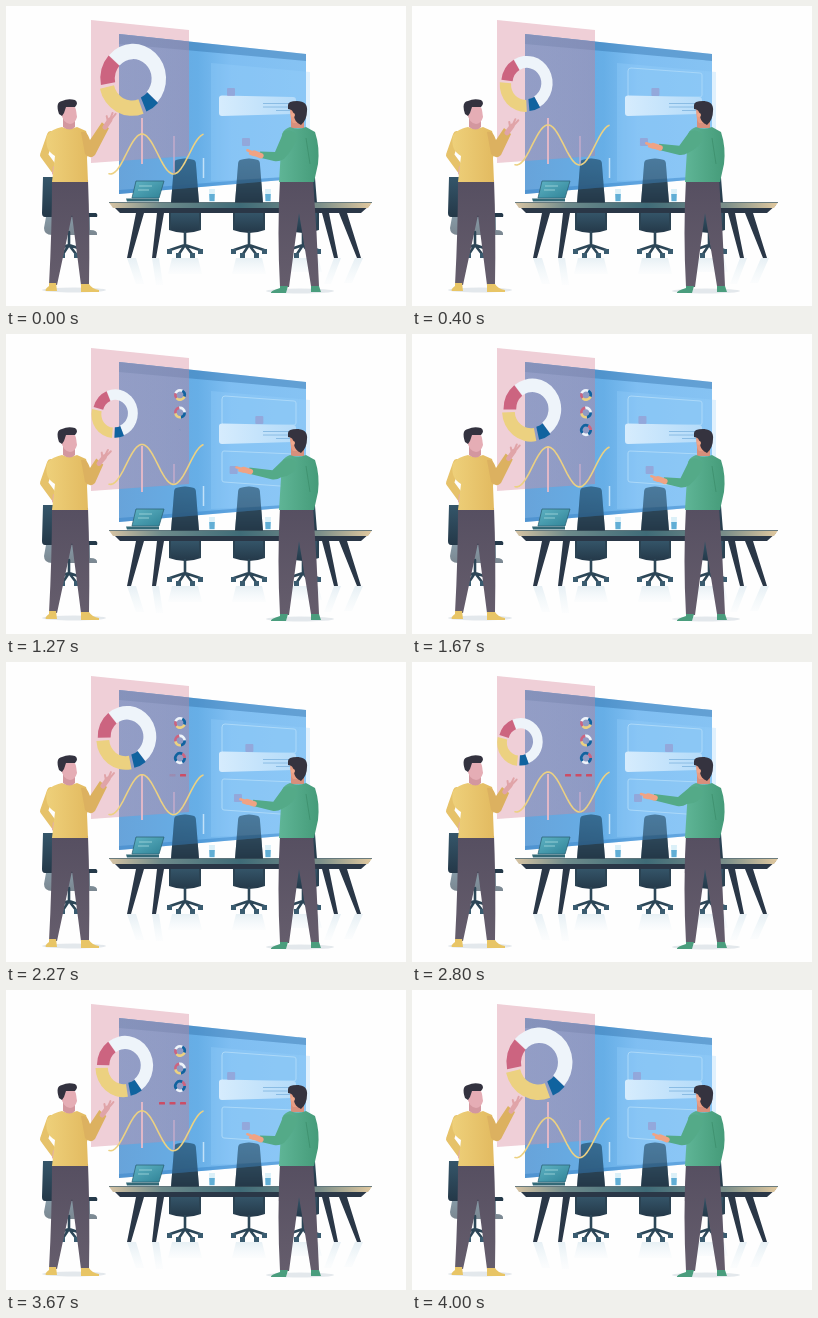
These frames come from a looping animation (400x300 px, 4.07 s). An HTML page:

```html
<!DOCTYPE html>
<html lang="en">
<head>
<meta charset="utf-8">
<title>Meeting</title>
<style>
html, body { margin: 0; width: 100%; height: 100%; overflow: hidden; background: #fefefe; }
svg { display: block; width: 100vw; height: 100vh; }
.line { fill: none; stroke-linecap: round; stroke-linejoin: round; }
</style>
</head>
<body>
<svg viewBox="0 0 400 300">
<defs>
  <linearGradient id="glass">
    <stop offset="0" stop-color="#3d8ad0" stop-opacity=".78"/>
    <stop offset=".42" stop-color="#3c98e0" stop-opacity=".78"/>
    <stop offset=".6" stop-color="#55a9ee" stop-opacity=".75"/>
    <stop offset="1" stop-color="#5caeef" stop-opacity=".74"/>
  </linearGradient>
  <linearGradient id="tint">
    <stop offset="0" stop-color="#d3a3b5" stop-opacity=".42"/>
    <stop offset="1" stop-color="#bd90a8" stop-opacity=".48"/>
  </linearGradient>
  <linearGradient id="card">
    <stop offset="0" stop-color="#d6ecfd"/>
    <stop offset="1" stop-color="#b4dbf9"/>
  </linearGradient>
  <linearGradient id="wood">
    <stop offset="0" stop-color="#d8c4a3"/>
    <stop offset=".2" stop-color="#6d8a8b"/>
    <stop offset=".5" stop-color="#3f6b77"/>
    <stop offset=".8" stop-color="#7b8f8a"/>
    <stop offset="1" stop-color="#e2c99f"/>
  </linearGradient>
  <linearGradient id="seat" x2="0" y2="1">
    <stop offset="0" stop-color="#35566a"/>
    <stop offset="1" stop-color="#243848"/>
  </linearGradient>
  <linearGradient id="screen" x2="1" y2="1">
    <stop offset="0" stop-color="#5fb3c4"/>
    <stop offset="1" stop-color="#2f8296"/>
  </linearGradient>
  <linearGradient id="shine" x2="0" y2="1">
    <stop offset="0" stop-color="#cfe1ea" stop-opacity=".5"/>
    <stop offset="1" stop-color="#e5f1f7" stop-opacity=".1"/>
  </linearGradient>
  <linearGradient id="yellow">
    <stop offset="0" stop-color="#eed07a"/>
    <stop offset="1" stop-color="#e2ba60"/>
  </linearGradient>
  <linearGradient id="green">
    <stop offset="0" stop-color="#5fb596"/>
    <stop offset="1" stop-color="#459b79"/>
  </linearGradient>
  <linearGradient id="trousers" x2="0" y2="1">
    <stop offset="0" stop-color="#564f61"/>
    <stop offset="1" stop-color="#655d6c"/>
  </linearGradient>
  <path id="back" d="M-9 154Q0 151 9 154Q11 155 11 159L14 197H-14L-11 159Q-11 155-9 154Z" fill="url(#seat)"/>
  <g id="chair">
    <use href="#back"/>
    <path d="M-14 206H14L16 224Q0 230-16 224Z" fill="url(#seat)"/>
    <path class="line" d="M-15 204V223M15 204V223" stroke="#2b4353" stroke-width="2"/>
    <use href="#base"/>
  </g>
  <g id="base">
    <path class="line" d="M0 226V240M0 239L-15 244M0 239L15 244M0 239L-6 248M0 239L7 248" stroke="#2c4657" stroke-width="2.6"/>
    <path d="M-18 243h5v5h-5zM13 243h5v5h-5zM-9 247h5v5h-5zM5 247h5v5H5z" fill="#3a5c70"/>
  </g>
  <g id="glassware">
    <path d="M-3 183H3L2.5 196H-2.5Z" fill="#d5edf7" opacity=".85"/>
    <path d="M-2.8 188H2.8L2.5 195H-2.5Z" fill="#61aed5"/>
  </g>
</defs>

<g fill="url(#shine)">
  <path d="M121 252L130 278H138L130 252ZM146 252L150 279H157L153 252ZM328 252L318 278H325L335 252ZM349 252L338 277H346L357 252Z"/>
  <path d="M166 252H192L196 268H162ZM230 252H256L260 268H226ZM284 252H312L316 266H280Z"/>
</g>
<g fill="#dbe1e6" opacity=".75">
  <ellipse cx="68" cy="284" rx="32" ry="2.5"/>
  <ellipse cx="294" cy="285" rx="34" ry="2.5"/>
</g>

<use href="#chair" x="179"/>
<use href="#chair" x="243"/>
<use href="#chair" x="297"/>
<g fill="#2a3747">
  <path d="M130 207H138L125 252H121ZM151 207H158L150 252H146ZM316 207H323L332 252H328ZM333 207H341L355 252H351Z"/>
  <path d="M106 199H364L355 207H114Z"/>
</g>
<path d="M103 196.500H366L362 202H107Z" fill="url(#wood)"/>
<path d="M103 196.500H366" stroke="#4b626a" stroke-width=".8"/>

<path d="M85 14L183 24V150L85 157Z" fill="#efcfd7"/>
<path d="M113 28L300 48V172L113 188Z" fill="url(#glass)"/>
<path d="M113 28L300 48V55L113 38Z" fill="#2e6ca6" opacity=".4"/>
<path d="M113 184L300 169V172L113 188Z" fill="#2f7bc0" opacity=".4"/>
<path d="M113 28L183 35.5V150L113 155Z" fill="url(#tint)"/>
<path d="M205 57L304 66V170L205 175Z" fill="#9ad2fa" opacity=".3"/>
<g opacity=".55">
  <use href="#back" x="179"/>
  <use href="#back" x="243"/>
</g>
<path d="M130 175H158L153 192H126Z" fill="url(#screen)" stroke="#2c6476" stroke-width=".8"/>
<path d="M133 180H146M132 184H143" stroke="#a5d8dd" stroke-width=".8"/>
<path d="M120 192.500H153V195.500H121Z" fill="#336977"/>
<use href="#glassware" x="206"/>
<use href="#glassware" x="262"/>

<g fill="#8fc5f1" fill-opacity=".15" stroke="#acd9f9" stroke-width="1">
  <path id="cardTop" d="M219 62L288 67Q290 67 290 69V89Q290 91 288 91L219 92Q216 92 216 89V65Q216 62 219 62Z"/>
  <path id="cardLow" d="M218 117L288 120Q290 120 290 122V151Q290 153 288 153L218 148Q216 148 216 146V119Q216 117 218 117Z"/>
</g>
<path d="M216 89.500L287 91Q290 91 290 94V105Q290 108 287 108L216 110Q213 110 213 107V92Q213 89.500 216 89.500Z" fill="url(#card)"/>
<path d="M257 97.500H286M257 101H286M270 104.500H286" stroke="#8abce4" stroke-width="1"/>
<rect id="knobTop" x="-4" y="82" width="8" height="8" rx="1" fill="#9a94c9" opacity=".6"/>
<rect id="knobLow" x="-4" y="132" width="8" height="8" rx="1" fill="#9a94c9" opacity=".6"/>

<path d="M136 112V158" stroke="#e9bbc8" stroke-width="1.800"/>
<path id="stem" stroke="#c3abcb" stroke-width="1.500"/>
<path d="M197.500 152V172" stroke="#c1e1f8" stroke-width="1.500"/>
<path id="wave" class="line" stroke="#ecd182" stroke-width="1.600"/>
<g id="donut"></g>
<g id="icons"></g>
<g id="dashes" fill="#cc4d65"></g>

<!-- left man -->
<path d="M37 171H49V207H90Q92 208 91 211H39Q36 211 36 207Z" fill="url(#seat)"/>
<path d="M40 211H84V224Q92 224 91 229H46Q38 229 38 222Z" fill="url(#seat)" opacity=".6"/>
<use href="#base" x="63"/>
<path d="M46 174H82Q84 224 83 279H75L66 209L51 279H43Q46 224 46 174Z" fill="url(#trousers)"/>
<path d="M43 277H50L51 285H40Q38 284 43 280ZM75 278H83Q86 283 93 284V286H75Z" fill="#e8c566"/>
<path class="line" d="M45 129L38 149L49 164" stroke="#e6c26a" stroke-width="8"/>
<path d="M47 160L54 165L50 171L46 168Z" fill="#e2a8ae"/>
<path d="M56 121Q63 124 71 121L80 125Q85 138 81 152L82 176H46L49 150Q38 144 41 129Q46 123 56 121Z" fill="url(#yellow)"/>
<path d="M57 111H69V121Q64 126 57 121Z" fill="#d3979f"/>
<path d="M55 100Q69 97 70 104L71 111Q69 118 64 118Q57 117 55 107Z" fill="#e5adb5"/>
<path d="M53 108Q49 96 56 95Q62 92 69 94Q73 97 69 101H60L58 107L56 110Z" fill="#33323f"/>
<path id="sleeveL" fill="#dcb160"/>
<g id="handL" class="line" stroke="#e0a4a8">
  <path d="M-2 4L3-3" stroke-width="5"/>
  <path d="M3-3L6-10M4-3L9-9M1-2L0-7" stroke-width="2"/>
</g>

<!-- right man -->
<path d="M274 173H307Q311 226 313 280H305L293 207L283 281H274Q271 226 274 173Z" fill="url(#trousers)"/>
<path d="M274 280H282L280 287H265Q264 285 274 282ZM305 280H313L315 286H305Z" fill="#4a9d7d"/>
<path d="M285 111H298V122H285Z" fill="#d88f7c"/>
<path d="M284 121Q292 124 300 121L309 126Q314 141 312 158L308 176H273L276 128Q278 123 284 121Z" fill="url(#green)"/>
<path d="M300 132L304 158" stroke="#3d8f6d" stroke-width=".8"/>
<path d="M284 101H295V117H287Q284 114 284 101Z" fill="#e89d84"/>
<path d="M282 99Q282 95 291 95Q302 95 301 105Q301 114 295 119Q288 116 288 109Q287 103 282 103Z" fill="#35333f"/>
<circle cx="287" cy="109" r="2" fill="#f0a88c"/>
<path id="sleeveR" fill="#54aa88"/>
<g id="handR" class="line" stroke="#f0a384">
  <path d="M2 1L-5-1" stroke-width="5.500"/>
  <path d="M-5-1L-12-3M-5 1L-9 0" stroke-width="2.500"/>
</g>
</svg>

<script>
const LOOP = 4070;
const BEAT = LOOP / 2;
const $ = id => document.getElementById(id);
const clamp = v => Math.max(0, Math.min(1, v));
const smooth = v => v * v * (3 - 2 * v);
const mix = (a, b, k) => a + (b - a) * k;
const ramp = (t, a, b) => smooth(clamp((t - a) / (b - a)));
const place = (id, x, y, extra = "") =>
  $(id).setAttribute("transform", `translate(${x} ${y}) ${extra}`);

// Ring slices as [start angle, sweep, colour, outward shift], drawn at unit radius.
const arc = ([start, sweep, colour, shift = 0]) => {
  const end = start + sweep, big = sweep > 180 ? 1 : 0;
  const polar = (deg, r) => [Math.cos, Math.sin].map(f => r * f(deg * Math.PI / 180));
  const [dx, dy] = polar(start + sweep / 2, shift);
  const at = (deg, r) => {
    const [x, y] = polar(deg, r);
    return `${x + dx} ${y + dy}`;
  };
  return `<path fill="${colour}" d="M${at(start, 1)}A1 1 0 ${big} 1 ${at(end, 1)}` +
    `L${at(end, .56)}A.56 .56 0 ${big} 0 ${at(start, .56)}Z"/>`;
};
const ring = slices => slices.map(arc).join("");
const white = "#eef4fa", yellow = "#ecd180", red = "#cc6480", navy = "#10639f";
$("donut").innerHTML = ring([[222, 180, white], [42, 25, navy, .03], [69, 98, yellow, .08], [169, 52, red]]);

const iconSets = [
  [[200, 100, white], [300, 80, navy], [20, 120, yellow], [140, 60, red]],
  [[260, 100, white], [0, 80, navy], [80, 90, yellow], [170, 90, red]],
  [[60, 80, white], [140, 160, navy], [300, 60, red], [0, 60, navy]]
];
const iconTimes = [[390, 650], [740, 1000], [1230, 1500]];
$("icons").innerHTML = iconSets.map(s => `<g>${ring(s)}</g>`).join("");
$("dashes").innerHTML = [174, 163.500, 153]
  .map(x => `<rect x="${x}" y="112" width="6" height="2.500" rx=".6"/>`).join("");

// Eased track through [time, value] pairs.
const track = (t, keys) => {
  let i = 1;
  while (i < keys.length - 1 && t > keys[i][0]) i++;
  const [a, from] = keys[i - 1], [b, to] = keys[i];
  return mix(from, to, ramp(t, a, b));
};
const reach = [[60, 0], [680, 1], [1110, 1], [1870, 0], [2600, 1], [2950, 1], [3700, 0], [LOOP, 0]];
const lift = [[0, 128], [800, 110], [1100, 110], [1970, 114], [2750, 110], [3150, 110], [LOOP, 128]];

function drawWave(top) {
  let d = "";
  for (let x = 103; x <= 197; x += 2) {
    const y = top + 20 - 20 * Math.cos((x - 136) / 31.500 * Math.PI);
    d += `${d ? "L" : "M"}${x} ${y.toFixed(2)}`;
  }
  $("wave").setAttribute("d", d);
  $("stem").setAttribute("d", `M168 130V${top + 39}`);
}

function drawLeftArm(s) {
  const x = mix(94, 100, s), y = mix(127, 118, s);
  $("sleeveL").setAttribute("d",
    `M75 126Q81 124 84 134L${x - 4} ${y - 2}L${x + 3} ${y + 4}L89 149Q84 154 79 148Z`);
  place("handL", x + 1, y - 1, `rotate(${mix(4, -2, s)})`);
}

function drawRightArm(q) {
  const wx = mix(253, 241, q), wy = mix(148.500, 135, q);
  const ex = mix(270, 267, q), ey = mix(153, 142, q);
  $("sleeveR").setAttribute("d",
    `M278 125Q287 122 291 131Q289 141 ${ex + 8} ${ey}Q${ex + 3} ${ey + 3} ${ex - 2} ${ey + 2}` +
    `L${wx} ${wy + 3}L${wx + 1} ${wy - 3}L${ex - 1} ${ey - 7}Z`);
  place("handR", wx, wy, `rotate(${mix(6, 0, q)})`);
}

function draw(t) {
  const s = Math.pow((1 + Math.cos((t + 55) / BEAT * 2 * Math.PI)) / 2, 2);
  const q = track(t, reach);
  const size = mix(22, 33, s);
  place("donut", mix(108.500, 127.500, s), mix(79.500, 72.500, s),
    `scale(${size} ${size * 1.06}) rotate(${mix(27, 0, s)})`);
  drawWave(track(t, lift));
  drawLeftArm(s);
  drawRightArm(q);
  place("knobTop", mix(225, 257, q), 0);
  place("knobLow", mix(240, 226, q), 0);

  const leave = 1 - ramp(t, 3740, 3960);
  [...$("icons").children].forEach((icon, i) => {
    const r = 6 * ramp(t, ...iconTimes[i]) * leave;
    icon.setAttribute("transform", `translate(174 ${61 + 17.500 * i}) scale(${r})`);
  });
  [...$("dashes").children].forEach((dash, i) => {
    dash.setAttribute("opacity", ramp(t, 2110 + 130 * i, 2220 + 130 * i) * leave);
  });
  $("cardTop").setAttribute("opacity", ramp(t, 80, 500));
  $("cardLow").setAttribute("opacity", ramp(t, 600, 1050));
}

function tick(now) {
  draw(now % LOOP);
  requestAnimationFrame(tick);
}
draw(0);
requestAnimationFrame(tick);
</script>
</body>
</html>
```
